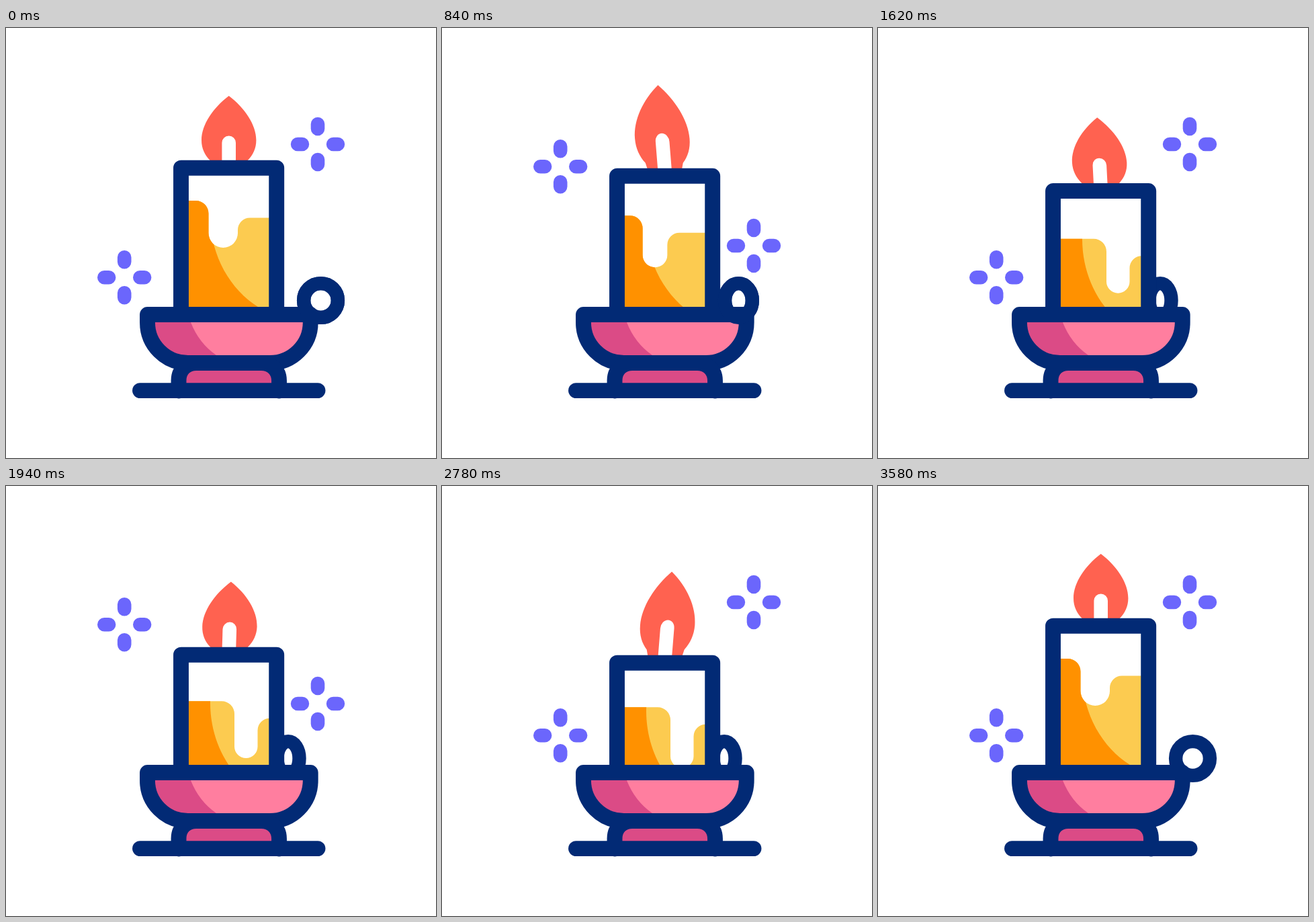
An HTML page that plays this animation: 640 by 640 pixels, repeating every 3600 ms.

```html
<!DOCTYPE html>
<html lang="en">
<head>
<meta charset="utf-8">
<title>Candle</title>
<style>
  html, body { margin: 0; width: 100%; height: 100%; overflow: hidden; background: #fff; }
  svg { display: block; width: 100vw; height: 100vh; }
  .line { fill: none; stroke: #022a75; stroke-width: 22.9; stroke-linejoin: round; stroke-linecap: round; }
  .ring { fill: none; stroke: #022a75; stroke-width: 20.4; }
</style>
</head>
<body>
<svg viewBox="0 0 640 640">
  <defs>
    <path id="spark" d="M0-29.9V-23.1M0 23.1V29.9M-29.9 0H-23.1M23.1 0H29.9"
      fill="none" stroke="#6b66fc" stroke-width="20.6" stroke-linecap="round"/>
    <clipPath id="waxClip"><path id="waxEdge"/></clipPath>
  </defs>

  <use id="sparkL" href="#spark"/>
  <use id="sparkR" href="#spark"/>

  <!-- flame coordinates: origin at the middle of the candle's top edge -->
  <g id="flame">
    <path fill="#ff6250" d="M0-96C-23.7-78-40.7-53-40.7-30C-40.7-18-36-8-28 0L-25.5 8H25.5L28 0C36-8 40.7-18 40.7-30C40.7-53 23.7-78 0-96Z"/>
    <path fill="#fff" d="M-10.3 10V-26.2a10.3 10.3 0 0 1 20.6 0V10Z"/>
  </g>

  <ellipse id="ringBack" class="ring" cy="405.5" ry="25.4"/>

  <path id="body" fill="#fff"/>
  <g clip-path="url(#waxClip)">
    <rect x="262" y="230" width="140" height="200" fill="#fccb50"/>
    <path id="shade" fill="#ff9100" d="M262 240H308Q304 266 304 280C304 340 335 390 375 415L400 431H262Z"/>
  </g>
  <path id="frame" class="line"/>

  <path fill="#ff7e9f" d="M210.5 426.5H453.2V438.2a60.3 60.3 0 0 1-60.3 60.3H270.8a60.3 60.3 0 0 1-60.3-60.3Z"/>
  <path fill="#db4b86" d="M210.5 430H272L275 438Q287 469 313 487L328 497H270.8a60.3 60.3 0 0 1-60.3-60.3Z"/>
  <path class="line" fill="none" d="M210.5 426.5H453.2V438.2a60.3 60.3 0 0 1-60.3 60.3H270.8a60.3 60.3 0 0 1-60.3-60.3Z"/>
  <path fill="#db4b86" d="M257 540V525C257 509 268 498.5 283 498.5H380C395 498.5 406.5 509 406.5 525V540Z"/>
  <path class="line" d="M257 540V525C257 509 268 498.5 283 498.5H380C395 498.5 406.5 509 406.5 525V540"/>
  <path class="line" d="M199.5 539.6H464"/>
  <ellipse id="ringFront" class="ring" cy="405.5" ry="25.4"/>
</svg>
<script>
const LOOP = 3600, END = 3580, TOP = 197;
const $ = id => document.getElementById(id);
const set = (id, attrs) => {
  for (const k in attrs) $(id).setAttribute(k, attrs[k]);
};

// eased value through [time, value] keys
function track(t, ...keys) {
  for (let i = 1; i < keys.length; i++) {
    const [t0, a] = keys[i - 1], [t1, b] = keys[i];
    if (t < t1) {
      const x = Math.max(0, (t - t0) / (t1 - t0));
      return a + (b - a) * x * x * (3 - 2 * x);
    }
  }
  return keys[keys.length - 1][1];
}
const hold = (t, a, b, c) => track(t, [a, 0], [b, 1], [c, 1], [END, 0]);

function drawFlame(t, drop) {
  const grow = track(t, [0, 0], [720, 1], [1790, 0], [2850, 1], [END, 0]);
  const lean = track(t, [0, 0], [1150, -0.118], [2500, 0.118], [END, 0]);
  const s = 1 + 0.213 * grow;
  // stretched about a point 40 below the rim, leaning about a point 10 below it
  set('flame', { transform: `matrix(1 0 ${-lean} ${s} ${331.7 + 10 * lean} ${TOP + drop + 40 - 40 * s})` });
}

function drawWax(t, drop) {
  const left = track(t, [0, 301.5], [800, 298.3], [1560, 340], [2920, 340], [END, 301.5]);
  const right = track(t, [0, 345], [800, 335], [1560, 374.5], [2920, 374.5], [END, 345]);
  const top = 257 + 0.75 * drop + 31 * hold(t, 240, 1580, 2863);
  const tip = 327 + 1.2 * drop + 26.5 * hold(t, 0, 1560, 2960);
  const r = (right - left) / 2;
  set('waxEdge', {
    d: `M262 ${top}H${left - 19}a19 19 0 0 1 19 19V${tip - r}a${r} ${r} 0 0 0 ${2 * r} 0` +
       `V${top + 43.5}a18 18 0 0 1 18-18H410V430H262Z`
  });
  set('shade', { transform: `translate(0 ${drop})` });
}

function drawRing(t) {
  const p = hold(t, 0, 1560, 2920);
  const shape = { cx: 468.5 - 48.5 * p, rx: 25.4 - 8.9 * p };
  set('ringBack', shape);
  set('ringFront', { ...shape, visibility: t < 1560 ? 'visible' : 'hidden' });
}

function draw(t) {
  const drop = track(t, [0, 0], [2780, 55], [END, 0]);
  const outline = `M260.5 427V${TOP + drop + 11.2}H402.7V427`;
  set('body', { d: outline });
  set('frame', { d: outline });
  drawFlame(t, drop);
  drawWax(t, drop);
  drawRing(t);
  const swap = t < END && Math.floor(t / 600) % 2;
  set('sparkL', { transform: `translate(176.2 ${swap ? 206.2 : 371.2})` });
  set('sparkR', { transform: `translate(464 ${swap ? 324 : 173})` });
}

const start = performance.now();
function tick() {
  draw((performance.now() - start) % LOOP);
  requestAnimationFrame(tick);
}
draw(0);
requestAnimationFrame(tick);
</script>
</body>
</html>
```
